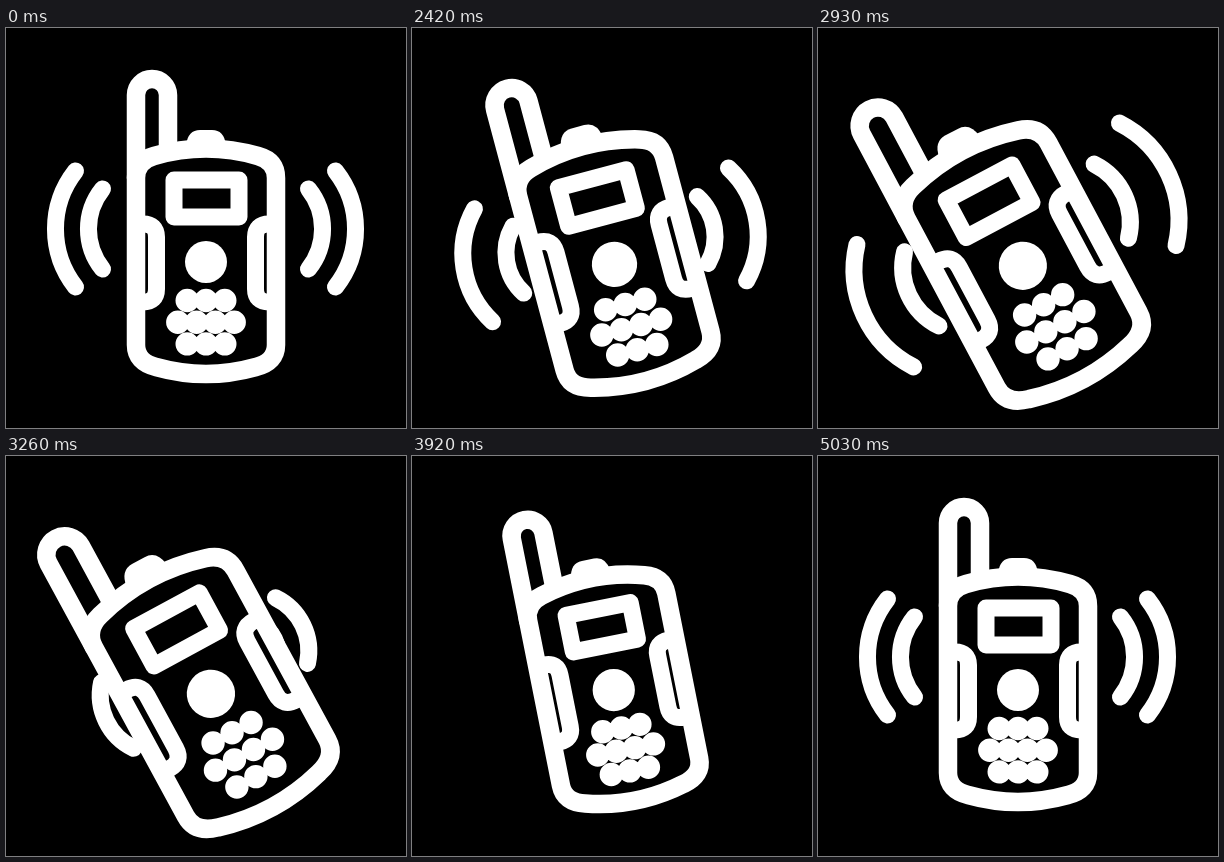
Write an HTML page that moves like this. It is 400 px wide and 400 px high and loops after 5060 ms.

```html
<!DOCTYPE html>
<html lang="en">
<head>
<meta charset="utf-8">
<title>Walkie-talkie</title>
<style>
  html, body { margin: 0; width: 100%; height: 100%; overflow: hidden; background: #000; }
  svg { display: block; width: 100vw; height: 100vh; }
  path, rect { fill: none; stroke: #fff; stroke-width: 18.5; stroke-linecap: round; stroke-linejoin: round; vector-effect: non-scaling-stroke; }
  .white { fill: #fff; stroke: none; }
  .solid { fill: #000; }
  .thin { stroke-width: 17; }
  #keypad { stroke-width: 23.4; }
</style>
</head>
<body>
<svg viewBox="0 0 400 400">
  <g id="waves">
    <path class="outer thin" d="M90 -58A94 94 0 0 1 90 58"/>
    <path class="outer thin left" d="M90 -58A94 94 0 0 1 90 58"/>
    <path class="inner thin" d="M63 -40A64 64 0 0 1 63 40"/>
    <path class="inner thin left" d="M63 -40A64 64 0 0 1 63 40"/>
  </g>
  <g id="radio">
    <path d="M130 150V67a16 16 0 0 1 32 0V121"/>
    <path class="white" d="M180 117q2 -15 14 -15h12q12 0 14 15z"/>
    <path class="solid" d="M130 150Q130 133 148 128Q200 113 252 128Q270 133 270 150V317Q270 334 250 339Q200 353 150 339Q130 334 130 317Z"/>
    <path class="thin" d="M130 196h7q13.5 0 13.5 13v52q0 13 -13.5 13h-7"/>
    <path class="thin" d="M270 196h-7q-13.5 0 -13.5 13v52q0 13 13.5 13h7"/>
    <rect class="thin" x="168" y="152" width="65" height="37"/>
    <circle class="white" cx="200" cy="234" r="21"/>
    <path id="keypad"/>
  </g>
</svg>
<script>
const LOOP = 5060;
const radio = document.getElementById('radio');
const waves = document.getElementById('waves');

// Keypad: rows of 3, 4 and 3 round dots
document.getElementById('keypad').setAttribute('d', [3, 4, 3].map((count, row) =>
  Array.from({ length: count }, (_, i) =>
    `M${200 + (i - (count - 1) / 2) * 18.8} ${272.5 + row * 21.7}h0`).join('')).join(''));

const clamp = u => Math.min(1, Math.max(0, u));
const settle = u => 1 - (1 - clamp(u)) ** 4 * (1 + 4 * clamp(u));
const smooth = u => clamp(u) ** 2 * (3 - 2 * clamp(u));

// Rises from 0 to 1 at one time and falls back at another
const swing = (t, rise, fall, riseTime = 1200, fallTime = riseTime) =>
  settle((t - rise) / riseTime) - settle((t - fall) / fallTime);

// Turning points of the wave pulse: [time, scale]
const beats = [[2030, 1], [2200, 0.7], [2740, 1.48], [3210, 0.6], [3660, 1.45], [3960, 0], [4470, 1.11], [4720, 1]];
const pulse = t => beats.slice(1).reduce((s, [end, value], i) => {
  const [begin, from] = beats[i];
  return s + (value - from) * smooth((t - begin) / (end - begin));
}, beats[0][1]);

function placeArcs(name, scale) {
  const s = Math.max(0.01, scale);
  for (const arc of waves.querySelectorAll('.' + name)) {
    const side = arc.classList.contains('left') ? -1 : 1;
    arc.setAttribute('transform', `translate(${40 * side} 0) scale(${s * side} ${s})`);
  }
}

function draw(t) {
  const tilt = 28.5 * swing(t, 2030, 3480);
  const size = 1 + 0.15 * swing(t, 2030, 3450, 1200, 700);
  radio.setAttribute('transform',
    `translate(200 200) scale(${size}) translate(-200 -200) rotate(${-tilt} 200 225)`);

  const waveTilt = 26 * swing(t, 2130, 3380);
  const lift = swing(t, 2030, 3640, 500);
  waves.setAttribute('transform', `translate(${199.5 - lift} ${201 + 16 * lift}) rotate(${-waveTilt})`);
  placeArcs('outer', pulse(t));
  placeArcs('inner', pulse(t) - 0.14 * lift);
}

const start = performance.now();
function tick() {
  draw((performance.now() - start) % LOOP);
  requestAnimationFrame(tick);
}
tick();
</script>
</body>
</html>
```
